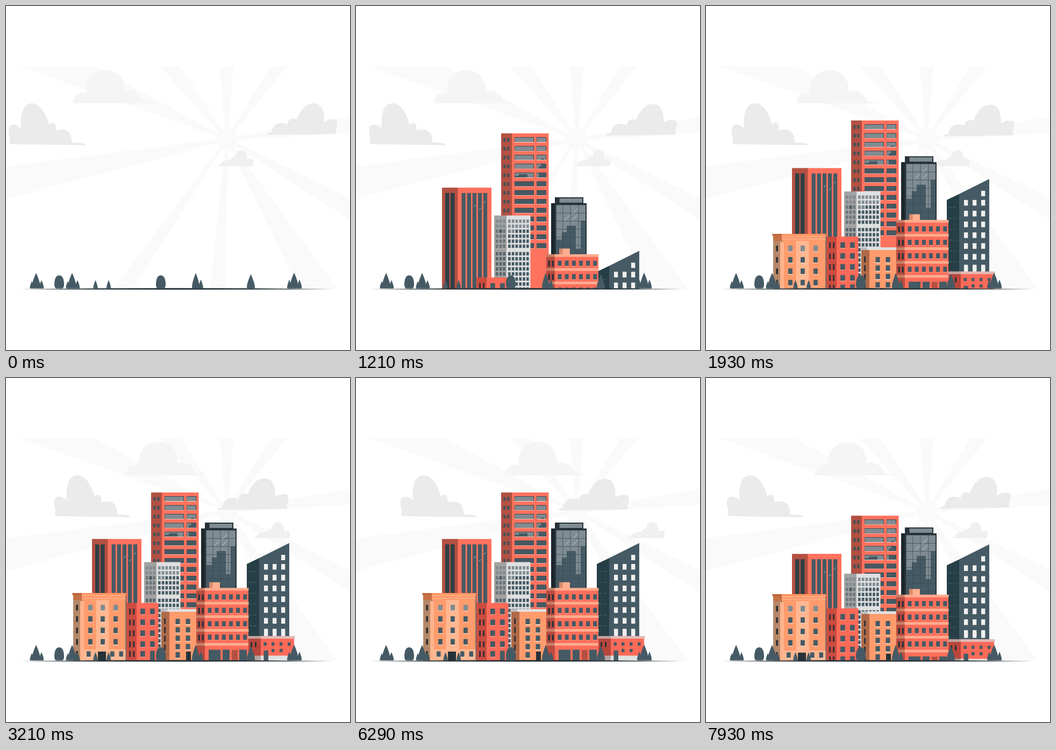
An HTML page with a canvas that plays this animation: 640x640 px, repeating every 8 s.

```html
<!DOCTYPE html>
<html lang="en">
<head>
<meta charset="utf-8">
<title>City skyline</title>
<style>
html, body { margin: 0; width: 100%; height: 100%; overflow: hidden; background: #fff; }
canvas { display: block; }
</style>
</head>
<body>
<canvas id="stage" width="640" height="640"></canvas>
<script>
const ctx = document.getElementById('stage').getContext('2d');
const LOOP = 8000, GROUND = 526;
const RED = '#ff725e', RED_SIDE = '#b35042', SLATE = '#455a64', DARK = '#263238',
  GLASS = '#7f8c92', PALE = '#e0e0e0', ORANGE = '#ff9b6c', PEACH = '#ffb791';

const clamp = u => Math.max(0, Math.min(1, u));

// Drawing helpers; rectangles are given by their edges.
function box(color, x1, y1, x2, y2) {
  ctx.fillStyle = color;
  ctx.fillRect(x1, y1, x2 - x1, y2 - y1);
}
function poly(color, ...pts) {
  ctx.fillStyle = color;
  ctx.beginPath();
  for (let i = 0; i < pts.length; i += 2) ctx.lineTo(pts[i], pts[i + 1]);
  ctx.fill();
}
function fillPath(color, path) {
  ctx.fillStyle = color;
  ctx.fill(path);
}
function grid(color, xs, ys, w, h, sill) {
  for (const y of ys) for (const x of xs) {
    if (sill) box(sill, x - 0.5, y + h, x + w + 1, y + h + 1.3);
    box(color, x, y, x + w, y + h);
  }
}
function glint(x, y, size) {
  ctx.strokeStyle = '#e6eaec';
  ctx.lineWidth = 0.8;
  ctx.beginPath();
  ctx.moveTo(x, y);
  ctx.lineTo(x + size, y - size);
  ctx.stroke();
}
const steps = (start, step, count) => Array.from({ length: count }, (_, i) => start + i * step);

// Sun and rays
const rays = [
  [25, 112, 165, 112], [286, 112, 325, 112], [398, 112, 423, 112], [492, 112, 523, 112],
  [640, 206, 640, 236], [640, 357, 640, 398], [617, 526, 545, 526], [408, 526, 380, 526],
  [238, 524, 202, 524], [0, 359, 0, 298]
];
function drawSun() {
  const sun = new Path2D();
  for (const [x1, y1, x2, y2] of rays) {
    const dx = x2 - x1, dy = y2 - y1, k = 2.5 / Math.hypot(dx, dy);
    const ray = new Path2D();
    ray.moveTo(x1, y1);
    ray.lineTo(x2, y2);
    ray.lineTo(411 + dx * k, 248 + dy * k);
    ray.lineTo(411 - dx * k, 248 - dy * k);
    ray.closePath();
    fillPath('#fafafa', ray);
  }
  sun.arc(411, 248, 20, 0, 7);
  fillPath('#fafafa', sun);
}

// Clouds sway out to `reach` at time `peak` and return at their own rate.
const clouds = [
  { color: '#f5f5f5', reach: 160, start: -148, peak: 5720, back: 4360,
    path: 'M124 181C125 167 136 157 149 163C147 135 163 119 186 119C208 119 222 137 221 159C233 153 247 161 256 177C262 179 270 179 275 181Z' },
  { color: '#f0f0f0', reach: 116, start: -71, peak: 5850, back: 4406,
    path: 'M393 298Q394 295 398 296C400 289 409 286 418 286C420 281 424 279 427 280C428 271 433 268 439 268C446 268 450 275 449 286C453 283 459 284 461 287Q461 294 459 298Z' },
  { color: '#ebebeb', reach: 102, start: -118, peak: 4435, back: 5764,
    path: 'M8 257C5 254 5 250 8 249C4 240 3 226 8 222C15 219 23 222 28 228C27 215 26 181 48 181C65 181 75 203 80 221C84 215 90 216 92 222Q93 227 93 232C100 228 111 229 117 235C122 241 122 249 122 254C130 254 146 254 148 259Z' },
  { color: '#ebebeb', reach: -127, start: -125, peak: 5050, back: 5080, drop: 7.5,
    path: 'M486 240Q485 235 494 236C495 224 504 216 515 218C519 218 522 219 524 221C524 212 532 207 541 211C547 195 558 181 572 181C588 181 593 196 592 216C600 210 611 209 616 213C618 220 616 228 613 232Q617 234 614 238Z' }
].map(c => ({ ...c, path: new Path2D(c.path) }));

function drawCloud(c, t) {
  const phase = t < c.peak ? (t - c.start) / (c.peak - c.start) : 1 + (t - c.peak) / c.back;
  const sway = (1 - Math.cos(Math.PI * phase)) / 2;
  ctx.save();
  ctx.translate(c.reach * sway, (c.drop || 0) * sway);
  fillPath(c.color, c.path);
  ctx.restore();
}

// Buildings, drawn in their raised position
function slantedBlock() {
  poly('#263f46', 448, 346, 471, 335, 471, 526, 448, 526);
  poly(SLATE, 471, 335, 527, 307, 527, 526, 471, 526);
  grid('#48616a', [452, 460], steps(359.5, 20.2, 8), 5, 1.2);
  const rows = steps(346, 20.1, 7);
  grid('#f0f0f0', [480, 496, 512], rows, 7.3, 10.5);
  box('#f0f0f0', 512, 329, 519.3, 339);
  grid('#f0f0f0', [480, 496, 512], [470], 7.3, 11);
}
function glassTower() {
  box(DARK, 370, 269, 423, 281);
  box(GLASS, 378.5, 271, 421, 279);
  box('#1c272d', 363, 280, 370, 526);
  box(DARK, 369, 280, 429, 526);
  box(GLASS, 372.5, 283.5, 427, 526);
  poly(SLATE, 372.5, 348, 383, 348, 383, 334, 392, 334, 392, 322, 409, 322, 409, 365,
    418, 365, 418, 313, 427, 313, 427, 526, 372.5, 526);
  for (const x of [384.5, 398.5, 413.5]) box('#3a4a52', x, 283.5, x + 0.7, 526);
  for (const y of steps(298, 15, 7)) box('#3a4a52', 372.5, y, 427, y + 0.7);
  glint(403, 299, 9);
  glint(389, 311, 9);
  glint(403, 311, 9);
}
function redHighrise() {
  box(RED_SIDE, 270, 213, 290, 526);
  box(RED, 290, 213, 358.5, 526);
  steps(220, 16.45, 13).forEach((y, row) => {
    grid('#4b5157', [274, 281], [y + 1.5], 4.6, 7);
    for (const [x1, x2] of [[295, 331], [336, 354]]) {
      box('#ffd2ca', x1, y + 9, x2, y + 10);
      box('#37474f', x1, y, x2, y + 9);
      box(row < 5 ? GLASS : SLATE, x1 + 0.5, y + 1, x2 - 1, y + 9);
    }
    if (row === 2) box(SLATE, 344, y + 7, 350, y + 9);
    if (row === 3) poly(SLATE, 340, y + 9, 340, y + 5, 344, y + 5, 344, y, 353, y, 353, y + 9);
    if (row === 4) {
      poly(SLATE, 295, y + 6, 303, y + 6, 303, y + 3, 319, y + 3, 319, y + 9, 295, y + 9);
      box(SLATE, 340, y + 1, 353, y + 9);
    }
  });
}
function stripedTower() {
  box(RED_SIDE, 160, 299.5, 190, 526);
  box(RED, 189.5, 299.5, 252, 526);
  grid('#2f3e45', [166, 176], [309.5], 7.5, 217);
  grid(SLATE, steps(196.5, 10.1, 5), [309.5], 7.3, 217);
  glint(219, 335.5, 4);
  glint(229, 341, 3.5);
  glint(238, 328, 3);
}
function whiteBlock() {
  box('#a3a3a3', 257, 342.5, 280, 526);
  box(PALE, 280, 342.5, 324.5, 526);
  const rows = [...steps(350, 9.3, 6), ...steps(410.5, 9.4, 11)];
  rows.forEach((y, row) => {
    const lit = row < 2;
    grid(lit ? '#848b8f' : row < 6 ? '#6d767b' : '#59656b', [260, 266.7, 273.3], [y], 4.6, 6.3);
    grid(lit ? GLASS : SLATE, steps(283, 6.8, 6), [y], 4.6, 6.3);
  });
  box(SLATE, 266.7, 368.6, 271.3, 375);
  grid(GLASS, [283, 289.8], [368.6], 4.6, 6.3);
}
function narrowOrange() {
  box('#b06a48', 289, 433, 304, 526);
  box(ORANGE, 304, 433, 354.5, 526);
  box(PALE, 288, 430, 355, 435);
  box('#bdbdbd', 288, 430, 300, 435);
  grid('#37343a', [294], steps(447, 16.3, 5), 3.2, 11);
  grid(SLATE, [315.5, 334.5], steps(448, 15.6, 4), 8, 10, '#ffe6da');
  grid(SLATE, [315.5], [510], 8, 10.5, '#ffe6da');
  box(DARK, 335, 509, 344, 526);
}
function bandedOffice() {
  box('#d98b6c', 378, 380, 385, 391);
  box('#ffb08f', 384.5, 380, 398, 391);
  box('#bb4b3f', 354, 391, 370, 526);
  box('#fc6e5a', 370, 391, 451, 526);
  for (const y of [390.5, 416.5, 441.5, 467, 493]) {
    box('#c98066', 354, y, 370, y + 5);
    box('#ffab8f', 369.5, y, 451.5, y + 5);
  }
  const rows = steps(402.5, 25, 4);
  grid(DARK, [357.5, 364.5], rows, 3.3, 11);
  grid(SLATE, steps(375.5, 13.15, 6), rows, 7, 9.7, '#ff9a86');
  box(SLATE, 377, 505.5, 399, 526);
  box(SLATE, 403, 505.5, 416, 526);
  box(RED_SIDE, 420, 506, 431, 526);
  box(SLATE, 434, 505.5, 448, 526);
}
function lowShop() {
  box('#b8463b', 451, 484, 474, 526);
  box('#fc6a58', 474, 484, 536, 526);
  box('#e3b9b5', 450.5, 480, 537.5, 485);
  box('#c2a19e', 450.5, 480, 474, 485);
  box('#b5a3a1', 459, 516.5, 474, 526);
  box(PALE, 474, 516.5, 535, 526);
  grid(DARK, [455, 463], [491.5], 3, 9);
  grid(SLATE, [479.5, 494, 509, 524], [492], 5.5, 6);
  grid(SLATE, [494, 509], [504], 5.5, 6);
  box(SLATE, 479.5, 507, 488, 526);
}
function redHouse() {
  box('#cc4b3f', 224.5, 418.5, 243, 526);
  box('#fc6a58', 243, 418.5, 283.5, 526);
  const rows = steps(429, 20.3, 4);
  grid('#3d3237', [229, 236], [...rows, 508], 3.2, 11);
  grid(SLATE, [250, 268], rows, 8.7, 10.5, '#ffa595');
  grid(SLATE, [250], [508], 8.7, 10.5, '#ffa595');
  box(SLATE, 268, 507.5, 276.7, 526);
}
function wideOrange() {
  box('#b58869', 125, 403, 143, 526);
  box(ORANGE, 143, 403, 222.5, 526);
  box('#ffb38c', 138, 415, 145, 526);
  box(PEACH, 167.5, 413, 191.5, 526);
  box(PEACH, 143, 505, 222.5, 526);
  box('#c57145', 125, 404, 143, 413);
  box(ORANGE, 141, 404, 222.5, 413);
  box('#c0673f', 123.5, 400, 141, 404);
  box('#ff9560', 141, 400, 223.5, 404);
  box('#ffbd98', 141, 404, 222.5, 405);
  box('#ffbd98', 141, 409.5, 222.5, 410.5);
  const rows = steps(422, 21.2, 4);
  grid('#2f3033', [130.3], [...rows, 508], 3.7, 10.5);
  grid(SLATE, [153, 176, 200], rows, 7.8, 10.3, '#ffe0cf');
  grid(GLASS, [153, 176, 200], [422], 7.8, 10.3);
  grid(SLATE, [150, 194, 210.5], [508.5], 7.5, 10, '#ffe0cf');
  box(DARK, 171, 509, 186, 526);
}

// [draw, travel, rise start, rise end, sink start, sink length]
const buildings = [
  [slantedBlock, 219, 1025, 2555, 7502, 1900],
  [glassTower, 257, 590, 2636, 7309, 1900],
  [redHighrise, 313, 210, 1950, 6815, 2160],
  [stripedTower, 226.5, 282, 2362, 6951, 1975],
  [whiteBlock, 184, 552, 2360, 7040, 1820],
  [narrowOrange, 96, 1262, 2865, 7271, 1900],
  [bandedOffice, 147, 839, 2574, 7094, 1900],
  [lowShop, 46, 1372, 3070, 6967, 1900],
  [redHouse, 108, 1102, 2640, 7071, 1900],
  [wideOrange, 126, 1250, 2850, 7453, 1900]
];
function drawBuilding([draw, travel, start, end, sink, length], t) {
  const below = (1 - clamp((t - start) / (end - start))) ** 3 + clamp((t - sink) / length) ** 3;
  if (below >= 1) return;
  ctx.save();
  ctx.translate(0, travel * below);
  draw();
  ctx.restore();
}

// Trees and ground
const firs = [
  [48, 512, 3.6], [56, 496.5, 8], [66, 510, 4.2], [115, 512, 3.6], [123, 496.5, 8], [133, 510, 4.2],
  [166.5, 510, 4], [191, 510, 4], [353, 496.5, 7], [362.5, 509, 4.3], [455.5, 499, 7.5],
  [527, 509, 4], [536, 496, 8], [546, 509, 4.2]
];
function drawTree(x, top, half, round) {
  const b = 525.5, h = b - top, shoulder = round ? 0 : 0.22;
  const tree = new Path2D();
  tree.moveTo(x, top);
  tree.bezierCurveTo(x + half * (round ? 0.75 : 0.35), top + h * shoulder, x + half, top + h * (round ? 0.35 : 0.65), x + half, b - h * (round ? 0.3 : 0.08));
  tree.quadraticCurveTo(x + half, b, x + half * 0.5, b);
  tree.lineTo(x - half * 0.5, b);
  tree.quadraticCurveTo(x - half, b, x - half, b - h * (round ? 0.3 : 0.08));
  tree.bezierCurveTo(x - half, top + h * (round ? 0.35 : 0.65), x - half * (round ? 0.75 : 0.35), top + h * shoulder, x, top);
  fillPath(SLATE, tree);
}
const groundLine = new Path2D('M25.5 527Q318 522.6 609 527Q318 528.6 25.5 527Z');

function frame() {
  const t = performance.now() % LOOP;
  box('#fff', 0, 0, 640, 640);
  drawSun();
  for (const c of clouds) drawCloud(c, t);
  ctx.save();
  ctx.beginPath();
  ctx.rect(0, 0, 640, GROUND);
  ctx.clip();
  for (const b of buildings) drawBuilding(b, t);
  ctx.restore();
  fillPath(DARK, groundLine);
  for (const [x, top, half] of firs) drawTree(x, top, half);
  for (const x of [99, 288]) drawTree(x, 501, 9, true);
  requestAnimationFrame(frame);
}
frame();
</script>
</body>
</html>
```
